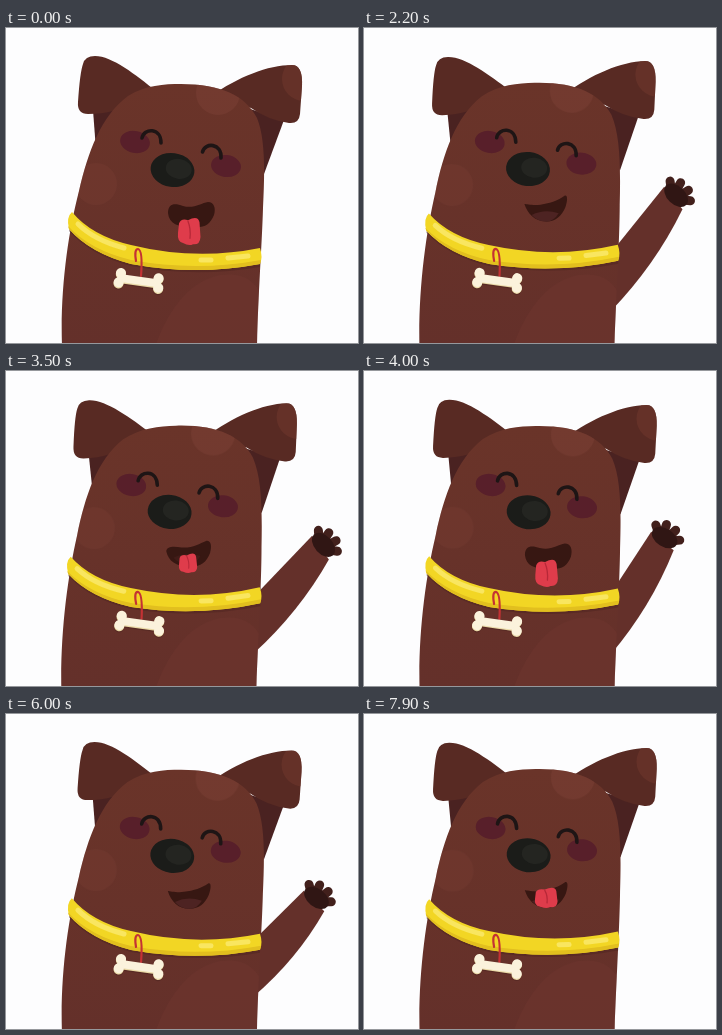
Write an HTML page that moves like this. It is 352 px wide and 315 px high and loops after 8000 ms.

```html
<!DOCTYPE html>
<html lang="en">
<head>
<meta charset="utf-8">
<title>Waving dog</title>
<style>
  html, body { margin: 0; width: 100%; height: 100%; overflow: hidden; background: #fdfdfe; }
  svg { display: block; width: 100vw; height: 100vh; }
  .round { fill: none; stroke-linecap: round; }
</style>
</head>
<body>
<svg viewBox="0 0 352 315">
  <defs>
    <linearGradient id="furFill" x1="0" y1="0" x2="0" y2="1">
      <stop offset="0" stop-color="#6a3429"/>
      <stop offset="1" stop-color="#64302a"/>
    </linearGradient>
    <clipPath id="bodyClip"><path id="clipShape"/></clipPath>
    <clipPath id="earClip"><use href="#rightEar"/></clipPath>
    <g id="boneShape" class="round">
      <path d="M-18 0H18" stroke-width="8"/>
      <path d="M-19 -5h.1M-20 4.500h.1M19 -5h.1M20 4.500h.1" stroke-width="10"/>
    </g>
  </defs>

  <g id="ears">
    <path d="M87 82L90 122L140 72Z" fill="#4a2221"/>
    <path d="M278 92L258 146L235 78Z" fill="#4a2221"/>
    <path d="M150 63C130 47 106 28 89 28Q79 28 77 36Q74 44 72 74Q71 86 82 86Q110 86 128 73Z" fill="#582a23"/>
    <path id="rightEar" d="M205 68C232 49 262 37 286 37Q297 37 296 58L294 86Q293 96 283 95Q262 92 245 80Z" fill="#582a23"/>
    <circle cx="298" cy="51" r="22" fill="#6b362c" opacity=".7" clip-path="url(#earClip)"/>
  </g>

  <g id="limb">
    <path id="arm" fill="#64302a"/>
    <g id="hand">
      <path id="fingers" class="round" stroke="#42201c" stroke-width="9"/>
      <ellipse cy="-4" rx="14" ry="9" fill="#301614"/>
    </g>
  </g>

  <path id="body" fill="url(#furFill)"/>
  <g clip-path="url(#bodyClip)">
    <path d="M150 316C163 280 185 252 215 247C238 244 252 254 258 274L256 316Z" fill="#733b33" opacity=".3"/>
    <g id="patches" fill="#7b4036" opacity=".5">
      <circle cx="212" cy="65" r="22"/>
      <circle cx="90" cy="156" r="21" opacity=".6"/>
    </g>
  </g>

  <g id="neck">
    <path d="M66 188Q86 216 125 222Q190 236 254 225L254 239Q190 250 125 238Q84 227 63 203Z" fill="#4e2420" opacity=".5"/>
    <path d="M66 184Q86 208 125 217Q190 233 254 220Q257 229 254 236Q190 248 125 236Q84 225 63 201Q60 189 66 184Z" fill="#f2d624"/>
    <path d="M62 198Q84 222 125 232Q190 244 255 232L254 236Q190 248 125 236Q84 225 63 201Z" fill="#e2bf1e"/>
    <path d="M72 196Q88 212 118 220M195 232h10M222 230l20 -2" class="round" stroke="#f9e660" stroke-width="5"/>
    <path d="M130 233Q128 221 132 221Q137 222 135 248" class="round" stroke="#c43234" stroke-width="2.200"/>
    <g id="bone">
      <use href="#boneShape" y="2" stroke="#4c2420" opacity=".5"/>
      <use href="#boneShape" y=".8" stroke="#ead9a6"/>
      <use href="#boneShape" y="-.4" stroke="#fbf2dc"/>
    </g>
  </g>

  <g id="face">
    <ellipse cx="129" cy="114" rx="15" ry="11" transform="rotate(12 129 114)" fill="#581f2a"/>
    <ellipse cx="220" cy="138" rx="15" ry="11" transform="rotate(8 220 138)" fill="#581f2a"/>
    <path d="M136 110C138 100 155 99 155 115M196.500 124C199 114 216 115 215 130" class="round" stroke="#1e1515" stroke-width="3.600"/>
    <g transform="translate(166.500 142) rotate(8)">
      <ellipse rx="22" ry="17" fill="#1b1c19"/>
      <ellipse cx="6" cy="-2" rx="13" ry="10" fill="#282925" opacity=".7"/>
    </g>
    <path id="mouth" fill="#371712"/>
    <path id="lip" fill="#4d2322"/>
    <g id="tongue">
      <path id="tongueShape" fill="#df3c4b"/>
      <path id="tongueLine" class="round" stroke="#b72838" stroke-width="1.300"/>
    </g>
  </g>
</svg>
<script>
const LOOP = 8000;
const PIVOT = [127, 205];
const BODY = "M56 318C54 262 62 205 73 163C82 124 95 88 122 68C140 57 158 56 175 56" +
  "C215 56 240 68 251 90C259 110 259 140 257 180C256 215 252 270 251 318Z";
const OPEN = "M162 185C162 175 169 175 177 178C188 181 195 175 202 174C208 174 210 180 208 187" +
  "C204 197 198 200 187 199C172 199 163 196 162 185Z";
const SMILE = "M162 177C164 177 171 179 178 178C188 177 196 174 202 170C205 168 206 173 203 181" +
  "C199 190 193 195 184 195C172 195 165 187 162 177Z";

const $ = id => document.getElementById(id);
const set = (id, name, value) => $(id).setAttribute(name, value);
const mix = (a, b, k) => a + (b - a) * k;

function ramp(t, from, to) {
  const k = Math.min(1, Math.max(0, (t - from) / (to - from)));
  return k * k * (3 - 2 * k);
}
const bump = (t, centre, width) => 1 - ramp(Math.abs(t - centre), 0, width);
const span = (t, from, to, ease) => ramp(t, from, from + ease) - ramp(t, to, to + ease);

// Rests at a slight tilt and rocks either way in single beats.
const tiltAt = t => -1.1 + 1.1 * bump(t, 0, 1000) - 1.7 * bump(t, 2900, 1000) + .95 * bump(t, 6000, 1000);

// Tilts the upper outline while the bottom stays planted.
function bend(path, deg) {
  return path.replace(/(\d+) (\d+)/g, (_, xs, ys) => {
    const x = +xs, y = +ys;
    const a = deg * Math.PI / 180 * Math.min(1, Math.max(0, (318 - y) / 100));
    const dx = x - PIVOT[0], dy = y - PIVOT[1];
    const px = PIVOT[0] + dx * Math.cos(a) - dy * Math.sin(a) + deg * .4;
    const py = PIVOT[1] + dx * Math.sin(a) + dy * Math.cos(a);
    return px.toFixed(2) + " " + py.toFixed(2);
  });
}

function morph(from, to, k) {
  const goal = to.match(/\d+/g);
  let i = 0;
  return from.replace(/\d+/g, v => mix(+v, +goal[i++], k).toFixed(2));
}

function fan() {
  let d = "";
  for (let i = 0; i < 4; i++) {
    const a = (i * 36 - 54) * Math.PI / 180;
    d += `M${8 * Math.sin(a)} -4L${17.5 * Math.sin(a)} ${-17 * Math.cos(a)}`;
  }
  return d;
}

// The raised arm swings out and back while slowly sinking.
function drawArm(t) {
  const raised = span(t, 1300, 6500, 650);
  const sink = Math.min(1, Math.max(0, (t - 2900) / 3100));
  const swing = Math.sin(Math.PI * (t - 2900) / 1033) ** 2 * (1 - .7 * sink);
  const x = mix(222, 292 + 16 * sink + 24 * swing, raised);
  const y = mix(285, 160 + 27 * sink + 14 * swing, raised);
  const deg = 28 + 10 * sink + 22 * swing;

  const a = (deg + 7) * Math.PI / 180, c = 14.5 * Math.cos(a), s = 14.5 * Math.sin(a);
  const bx = (248 + x + c) / 2 + 8, by = (283 + y + s) / 2 + 5;
  set("arm", "d", `M238 236L${x - c} ${y - s}L${x + c} ${y + s}Q${bx} ${by} 247 283L238 290Z`);
  set("hand", "transform", `translate(${x} ${y}) rotate(${deg})`);
  $("limb").style.visibility = raised > 0 ? "visible" : "hidden";
}

function drawMouth(t) {
  const jaw = 1 - ramp(t, 900, 1450) + span(t, 3300, 5200, 380);
  set("mouth", "d", morph(SMILE, OPEN, jaw));
  set("lip", "d", "M169 188Q182 182 196 187Q191 195 184 195Q175 195 169 188Z");
  $("lip").style.opacity = 1 - jaw;

  const size = 1 - ramp(t, 1300, 1600) + span(t, 3250, 5200, 350) + ramp(t, 7600, 7900);
  const top = mix(175, 190, jaw), height = mix(20, 27, jaw);
  const Y = k => top + height * k;
  set("tongueShape", "d",
    `M173 ${Y(.2)}Q175 ${Y(0)} 182 ${Y(.08)}Q192 ${Y(-.12)} 193.500 ${Y(.16)}L194.500 ${Y(.7)}` +
    `Q194 ${Y(1)} 187 ${Y(.97)}Q183 ${Y(1.05)} 177 ${Y(.93)}Q171 ${Y(.88)} 172 ${Y(.55)}Z`);
  set("tongueLine", "d", `M182 ${Y(.12)}Q185 ${Y(.4)} 184 ${Y(.75)}`);
  set("tongue", "transform", `translate(184 190) scale(${size}) translate(-184 -190)`);
}

function draw(t) {
  const tilt = tiltAt(t);
  const turn = `rotate(${tilt} ${PIVOT})`;
  for (const id of ["ears", "neck", "patches"]) set(id, "transform", `translate(${tilt * .4} 0) ${turn}`);
  set("face", "transform", `translate(${tilt * .6} 0) ${turn}`);
  set("bone", "transform", `translate(133 253) rotate(${8 - tilt})`);
  const shape = bend(BODY, tilt);
  set("body", "d", shape);
  set("clipShape", "d", shape);
  drawArm(t);
  drawMouth(t);
}

set("fingers", "d", fan());
const start = performance.now();
function tick(now) {
  draw(Math.max(0, now - start) % LOOP);
  requestAnimationFrame(tick);
}
draw(0);
requestAnimationFrame(tick);
</script>
</body>
</html>
```
